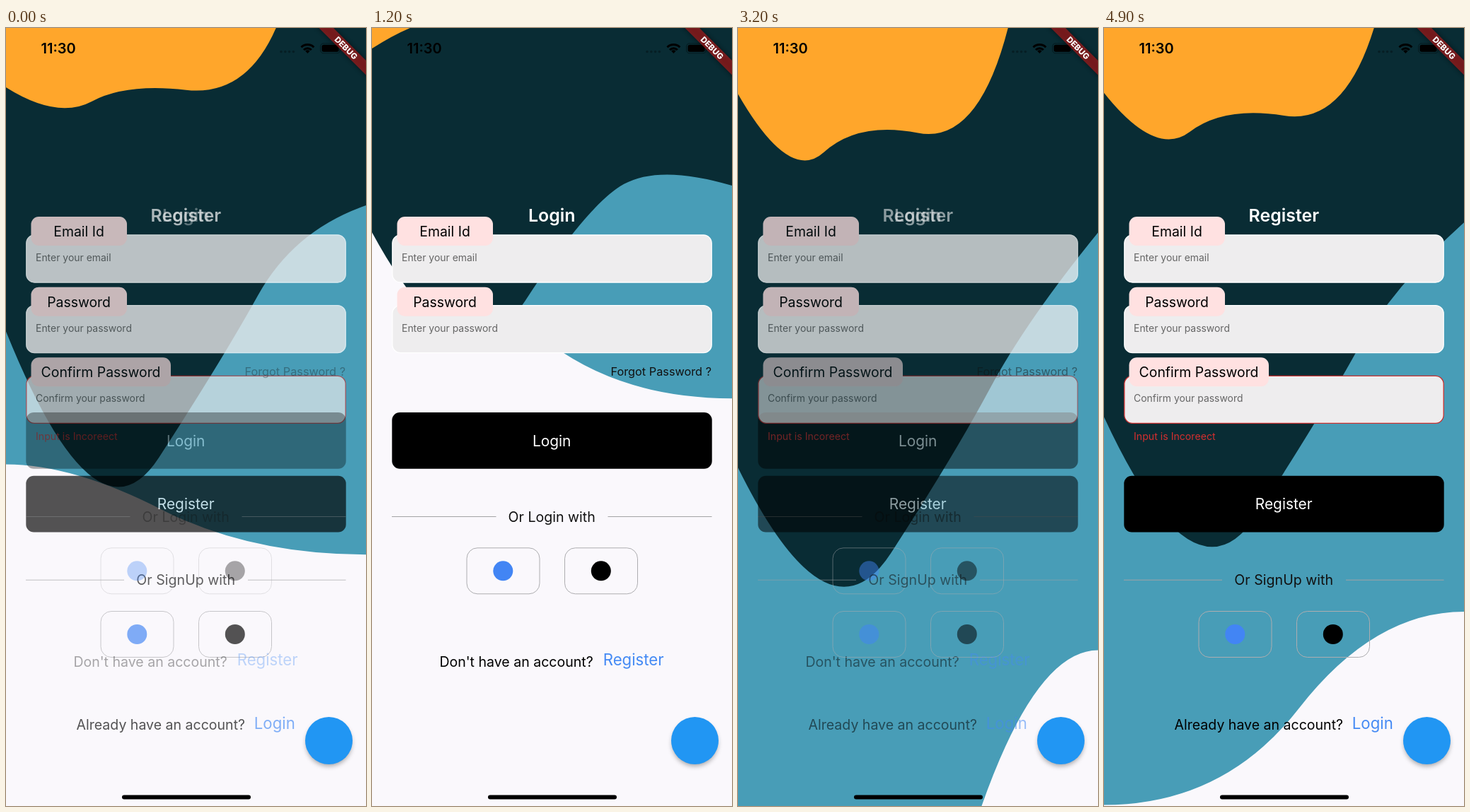
An HTML page for the animation above (5 s loop, 509 by 1101 pixels).

```html
<!DOCTYPE html>
<html lang="en">
<head>
<meta charset="utf-8">
<title>Login and register</title>
<style>
  html, body { margin: 0; width: 100%; height: 100%; overflow: hidden; background: #faf8fc; }
  svg { display: block; width: 509px; height: 1101px; font-family: Inter, Roboto, sans-serif; }
</style>
</head>
<body>
<svg viewBox="0 0 509 1101">
  <defs>
    <filter id="soft" x="-50%" y="-50%" width="200%" height="200%"><feGaussianBlur stdDeviation="3.5"/></filter>
  </defs>
  <path id="blue" fill="#489db7"/>
  <path id="dark" fill="#092c34"/>
  <path id="orange" fill="#ffa62b"/>
  <g id="forms"><g id="login"></g><g id="register"></g></g>

  <circle cx="456.5" cy="1012.5" r="32" opacity=".35" filter="url(#soft)"/>
  <circle cx="456.5" cy="1008.5" r="33.5" fill="#2196f3"/>
  <rect x="164" y="1085.5" width="182" height="6" rx="3"/>

  <text x="49.5" y="36" font-size="20" font-weight="600">11:30</text>
  <g opacity=".3">
    <circle cx="389" cy="33.5" r="1.8"/><circle cx="394.8" cy="33.5" r="1.8"/>
    <circle cx="400.6" cy="33.5" r="1.8"/><circle cx="406.4" cy="33.5" r="1.8"/>
  </g>
  <g fill="none" stroke="#000" stroke-width="3">
    <path d="M417.5 27.2a12.6 12.6 0 0 1 17.8 0"/>
    <path d="M421 31a7.8 7.8 0 0 1 10.8 0"/>
  </g>
  <path d="M426.4 36l-3.2-3.4a4.6 4.6 0 0 1 6.4 0z"/>
  <rect x="444.5" y="21.8" width="28" height="14" rx="4.5" fill="none" stroke="#000" stroke-opacity=".4"/>
  <rect x="446.5" y="23.8" width="24" height="10" rx="2.8"/>
  <path d="M474 26.5q2 2.3 0 4.6z" opacity=".4"/>

  <g transform="translate(509 0) rotate(45)">
    <rect x="-60" y="32.5" width="120" height="14.5" opacity=".5" filter="url(#soft)"/>
    <rect x="-60" y="32.5" width="120" height="14.5" fill="#b71c1c" fill-opacity=".63"/>
    <text y="44" font-size="11.5" font-weight="800" fill="#fff" text-anchor="middle">DEBUG</text>
  </g>
</svg>
<script>
const W = 509, H = 1101, LOOP = 5000, STEP = 100;
const RUN = 2000, FADE = 500;            // background and cross-fade durations
const BACK_AT = -167, FORWARD_AT = 2933; // when each transition begins
const $ = id => document.getElementById(id);

// ---- Forms ----
const text = (s, x, y, size, fill = '#000', anchor = 'middle', weight = 400) =>
  `<text x="${x}" y="${y}" font-size="${size}" fill="${fill}" text-anchor="${anchor}" font-weight="${weight}">${s}</text>`;
const box = (x, y, w, h, r, fill, stroke = 'none', sw = 1) =>
  `<rect x="${x}" y="${y}" width="${w}" height="${h}" rx="${r}" fill="${fill}" stroke="${stroke}" stroke-width="${sw}"/>`;

const title = s => text(s, 254.3, 273.5, 24.9, '#fff', 'middle', 600);
const field = (y, label, hint, labelW = 135.5, border = '#fff') =>
  box(28.8, y, 451.4, 67, 11.5, '#eeedee', border, 1.3) +
  box(35.5, y - 26, labelW, 41, 11, '#ffe1e1') +
  text(label, 35.3 + labelW / 2, y + 2, 19.4) +
  text(hint, 42, y + 37, 13.95, '#666', 'start');
const button = (y, s) => box(28.3, y, 452.4, 79.7, 11, '#000') + text(s, 254.2, y + 47.7, 20.9, '#fff');
const social = (y, s, gap) =>
  `<path d="M28 ${y}H${254.5 - gap}M${254.5 + gap} ${y}H480.5" stroke="#a3a3a5"/>` +
  text(s, 254.2, y + 7.2, 19.6, '#111') +
  [[134, '#4285f4'], [272.5, '#000']].map(([x, color]) =>
    box(x, y + 44.3, 103, 65, 15, 'none', '#adadb0') +
    `<circle cx="${x + 51.3}" cy="${y + 76.8}" r="14" fill="${color}"/>`).join('');
const footer = (y, s, x, link, linkX) =>
  text(s, x, y, 19.55) + text(link, linkX, y - 1.4, 22.2, '#448af4');
const basics = field(293, 'Email Id', 'Enter your email') + field(392.7, 'Password', 'Enter your password');

$('login').innerHTML = title('Login') + basics +
  text('Forgot Password ?', 480, 491.5, 16.3, '#111', 'end') +
  button(544, 'Login') + social(691.5, 'Or Login with', 79) +
  footer(903.5, "Don't have an account?", 204, 'Register', 369.7);
$('register').innerHTML = title('Register') + basics +
  field(492.3, 'Confirm Password', 'Confirm your password', 197.5, '#c62f2f') +
  text('Input is Incoreect', 42, 582.5, 14.15, '#d32f2f', 'start') +
  button(633.7, 'Register') + social(781.2, 'Or SignUp with', 87.5) +
  footer(993, 'Already have an account?', 218.8, 'Login', 379.8);

// ---- Easing ----
const clamp = v => Math.min(1, Math.max(0, v));
const lerp = (a, b, v) => a + (b - a) * v;
const spring = t => t >= 1 ? 1 : 1 - Math.exp(-t / 0.15) * Math.cos(19.4 * t);
const elasticOut = t => t <= 0 ? 0 : t >= 1 ? 1 : 1 + 2 ** (-10 * t) * Math.sin((t - 0.1) * 5 * Math.PI);
const cubic = (x1, y1, x2, y2) => x => {
  const at = (a, b, s) => 3 * a * s * (1 - s) ** 2 + 3 * b * s * s * (1 - s) + s ** 3;
  if (x <= 0 || x >= 1) return clamp(x);
  let lo = 0, hi = 1;
  for (let i = 0; i < 30; i++) {
    const mid = (lo + hi) / 2;
    if (at(x1, x2, mid) < x) lo = mid; else hi = mid;
  }
  return at(y1, y2, lo);
};
const inCirc = cubic(0.6, 0.04, 0.98, 0.335);
const inBack = cubic(0.6, -0.28, 0.735, 0.045);

// ---- Background ----
// Quadratic curves through the midpoints of the control points.
function blob(id, startX, leftY, pts) {
  let d = `M${startX} 0L0 0L0 ${leftY}`;
  for (let i = 0; i < pts.length - 1; i++) {
    const [x, y] = pts[i], [nx, ny] = pts[i + 1];
    const end = i === pts.length - 2 ? [nx, ny] : [(x + nx) / 2, (y + ny) / 2];
    d += `Q${x} ${y} ${end}`;
  }
  $(id).setAttribute('d', d + 'Z');
}

function drawBackground(c, forward) {
  const liquid = forward ? elasticOut(c) : inBack(c);
  const blue = forward ? spring(c) : inCirc(c);
  const dark = forward ? spring(clamp(c / 0.72)) : inCirc(c);
  const orange = forward ? spring(clamp(c / 0.56)) : c;
  const blueY = lerp(0, H, blue), rightY = lerp(H / 2, H * 3 / 4, liquid);

  blob('blue', W, blueY, [
    [lerp(0, W / 3, blue), blueY],
    [lerp(W / 2, W * 3 / 4, liquid), rightY],
    [W, rightY]]);
  blob('dark', W, lerp(H / 4, H / 2, dark), [
    [W / 4, lerp(H / 2, H * 3 / 4, liquid)],
    [W * 3 / 5, lerp(H / 4, H / 2, liquid)],
    [W * 4 / 5, lerp(H / 6, H / 3, dark)],
    [W, lerp(H / 5, H / 4, dark)]]);
  blob('orange', W * 3 / 4, H / 12 * orange, [
    [W / 7, H / 6 * liquid],
    [W / 3, H / 10 * liquid],
    [W * 2 / 3, H / 8 * liquid],
    [W * 3 / 4, 0]]);
}

function draw(t) {
  const forward = t > FORWARD_AT;
  const elapsed = t - (forward ? FORWARD_AT : BACK_AT);
  const c = clamp(elapsed / RUN), k = clamp(elapsed / FADE);
  drawBackground(forward ? c : 1 - c, forward);

  const [shown, hidden] = forward ? [$('register'), $('login')] : [$('login'), $('register')];
  shown.setAttribute('opacity', k);
  hidden.setAttribute('opacity', 1 - k);
  if ($('forms').lastElementChild !== shown) $('forms').append(shown);
}

let start;
function tick(now) {
  start ??= now;
  draw(Math.floor((now - start) % LOOP / STEP) * STEP);
  requestAnimationFrame(tick);
}
draw(0);
requestAnimationFrame(tick);
</script>
</body>
</html>
```
